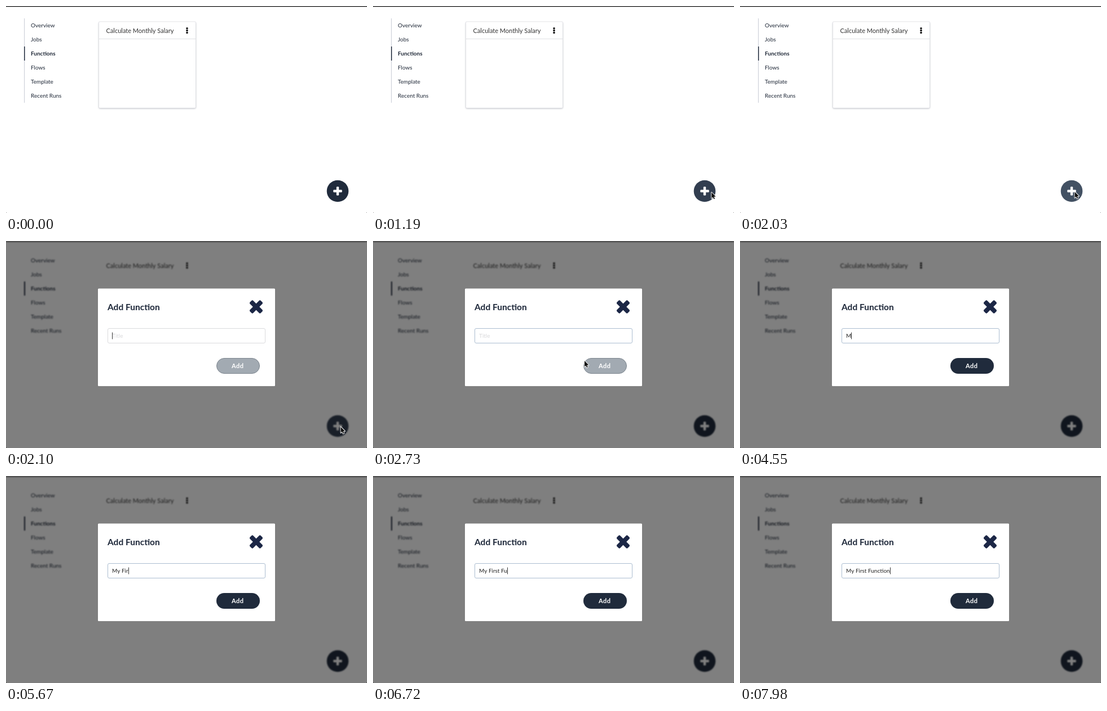
An HTML page with a canvas for the animation above (8 s loop, 640x368 px).

```html
<!DOCTYPE html>
<html lang="en">
<head>
<meta charset="utf-8">
<title>Add Function</title>
<style>
  html, body { margin: 0; width: 100%; height: 100%; overflow: hidden; background: #fff; }
  canvas { display: block; }
</style>
</head>
<body>
<canvas id="stage" width="640" height="368"></canvas>
<script>
const ctx = document.getElementById('stage').getContext('2d');
const LOOP = 8000, STEP = 70;
const OPEN = 2100, TYPE_START = 4480, TYPE_GAP = 212;
const NAVY = '#202b3c', HOVER = [67, 81, 99], REST = [32, 43, 60];
const MENU = ['Overview', 'Jobs', 'Functions', 'Flows', 'Template', 'Recent Runs'];
const TITLE = 'My First Function';
const PLUS = { x: 588, y: 329, r: 19.3 };

const clamp = v => Math.max(0, Math.min(1, v));
const progress = (t, from, to) => clamp((t - from) / (to - from));
const ease = p => p * p * (3 - 2 * p);
const mix = (a, b, p) => a + (b - a) * p;
const blend = (a, b, p) => `rgb(${a.map((v, i) => Math.round(mix(v, b[i], p)))})`;

function rect(x, y, w, h, color) {
  ctx.fillStyle = color;
  ctx.fillRect(x, y, w, h);
}

function rounded(x, y, w, h, r, fill, stroke) {
  ctx.beginPath();
  ctx.roundRect(x, y, w, h, r);
  if (fill) { ctx.fillStyle = fill; ctx.fill(); }
  if (stroke) { ctx.strokeStyle = stroke; ctx.lineWidth = 1; ctx.stroke(); }
}

function disc(x, y, r, color) {
  ctx.fillStyle = color;
  ctx.beginPath();
  ctx.arc(x, y, r, 0, Math.PI * 2);
  ctx.fill();
}

function text(value, x, y, size, color, weight = 400) {
  ctx.font = `${weight} ${size}px Lato, sans-serif`;
  ctx.fillStyle = color;
  ctx.fillText(value, x, y);
}

function cross(x, y, length, width, radius, angle, color) {
  ctx.save();
  ctx.translate(x, y);
  ctx.rotate(angle);
  rounded(-length / 2, -width / 2, length, width, radius, color);
  rounded(-width / 2, -length / 2, width, length, radius, color);
  ctx.restore();
}

function cardFrame() {
  ctx.save();
  ctx.shadowColor = 'rgba(40, 45, 70, .28)';
  ctx.shadowBlur = 3;
  ctx.shadowOffsetY = 1;
  rounded(164.5, 28, 172, 153.5, 2, '#fff');
  ctx.restore();
  rounded(164.5, 28, 172, 153.5, 2, null, 'rgba(90, 95, 115, .12)');
  rect(165, 58, 171, 1, '#e0e1e4');
}

function page(hover, dimmed) {
  rect(0, 0, 640, 368, '#fff');
  ctx.save();
  if (dimmed) {
    ctx.filter = 'blur(0.8px)';
  } else {
    rect(32, 22, 1.2, 150, '#cfd2d9');
    cardFrame();
  }
  rect(0, 0, 640, 1.4, '#252525');
  rect(32, 72, dimmed ? 2 : 1.5, 25, NAVY);
  MENU.forEach((label, i) =>
    text(label, 44, 37.5 + i * 25, 10, '#1f2837', i === 2 ? 700 : 400));
  text('Calculate Monthly Salary', 177.5, 47.5, 11, '#333');
  for (const y of [39.7, 43.6, 47.5]) disc(321, y, 1.8, '#111');
  disc(PLUS.x, PLUS.y, PLUS.r, blend(REST, HOVER, hover));
  cross(PLUS.x, PLUS.y, 15.5, 4.4, 1.2, 0, '#fff');
  ctx.restore();
  rect(0, 367, 1, 1, '#888');
  rect(639, 367, 1, 1, '#888');
  if (dimmed) rect(0, 0, 640, 368, 'rgba(0, 0, 0, .5)');
}

function modal(t) {
  const typed = TITLE.slice(0, Math.max(0, Math.floor((t - TYPE_START) / TYPE_GAP) + 1));
  const focus = progress(t, OPEN, OPEN + 420);

  rounded(163, 84.5, 314, 173.5, 1.5, '#fff');
  text('Add Function', 180, 123, 15.5, '#1d2739', 700);
  cross(443.5, 117, 27, 8, 2, Math.PI / 4, '#1c2746');
  rounded(180.5, 155.5, 279, 26, 2.5, '#fff', blend([218, 219, 222], [172, 190, 209], focus));

  if (typed) text(typed, 188, 172, 10, '#222');
  else text('Title', 188, 172, 10, '#d8d8da');
  const caretOn = typed || (t - OPEN) % 1060 < 530;
  if (caretOn) {
    const width = typed ? ctx.measureText(typed).width : 0;
    rect(Math.round(188 + width), 162.5, 1, 12, '#333');
  }

  if (typed) rounded(373, 208, 77, 28, 14, NAVY);
  else rounded(373.5, 208.5, 76, 27, 13.5, '#a2aab2', '#7c858e');
  ctx.letterSpacing = '0.5px';
  text('Add', 400, 226, 11, '#fff', 700);
  ctx.letterSpacing = '0px';
}

function arrow(x, y) {
  ctx.save();
  ctx.translate(x, y);
  ctx.beginPath();
  [[0, 0], [0, 10.5], [2.4, 8.3], [4.1, 12], [5.8, 11.2], [4.2, 7.7], [7.4, 7.5]]
    .forEach(p => ctx.lineTo(...p));
  ctx.closePath();
  ctx.lineJoin = 'round';
  ctx.lineWidth = 1.8;
  ctx.strokeStyle = '#fff';
  ctx.stroke();
  ctx.fillStyle = '#111';
  ctx.fill();
  ctx.restore();
}

function beam(x, y) {
  ctx.strokeStyle = '#222';
  ctx.lineWidth = 1;
  ctx.beginPath();
  ctx.moveTo(x - 3, y - 5.5);
  ctx.quadraticCurveTo(x, y - 5.5, x, y - 3.5);
  ctx.lineTo(x, y + 3.5);
  ctx.quadraticCurveTo(x, y + 5.5, x - 3, y + 5.5);
  ctx.moveTo(x + 3, y - 5.5);
  ctx.quadraticCurveTo(x, y - 5.5, x, y - 3.5);
  ctx.moveTo(x, y + 3.5);
  ctx.quadraticCurveTo(x, y + 5.5, x + 3, y + 5.5);
  ctx.moveTo(x - 1.5, y + 2.5);
  ctx.lineTo(x + 1.5, y + 2.5);
  ctx.stroke();
}

function pointerAt(t) {
  if (t < 910 || t >= TYPE_START) return null;
  if (t < OPEN) {
    const p = 1 - (1 - progress(t, 910, 1400)) ** 2;
    return { x: mix(630, 593.5, p), y: mix(335, 330.5, p) };
  }
  const p = ease(progress(t, 2310, 2940));
  return { x: mix(593.5, 298.5, p), y: mix(330.5, 172, p) };
}

function draw(t) {
  const dimmed = t >= OPEN;
  const hover = dimmed ? 0.5 * (1 - progress(t, 2310, 2590)) : progress(t, 1050, 1330);
  page(hover, dimmed);
  if (dimmed) modal(t);
  const p = pointerAt(t);
  if (!p) return;
  const overInput = dimmed && p.x > 180 && p.x < 460 && p.y > 155 && p.y < 182;
  (overInput ? beam : arrow)(p.x, p.y);
}

const start = performance.now();
function tick() {
  const t = (performance.now() - start) % LOOP;
  draw(Math.floor(t / STEP) * STEP);
  requestAnimationFrame(tick);
}
tick();
</script>
</body>
</html>
```
